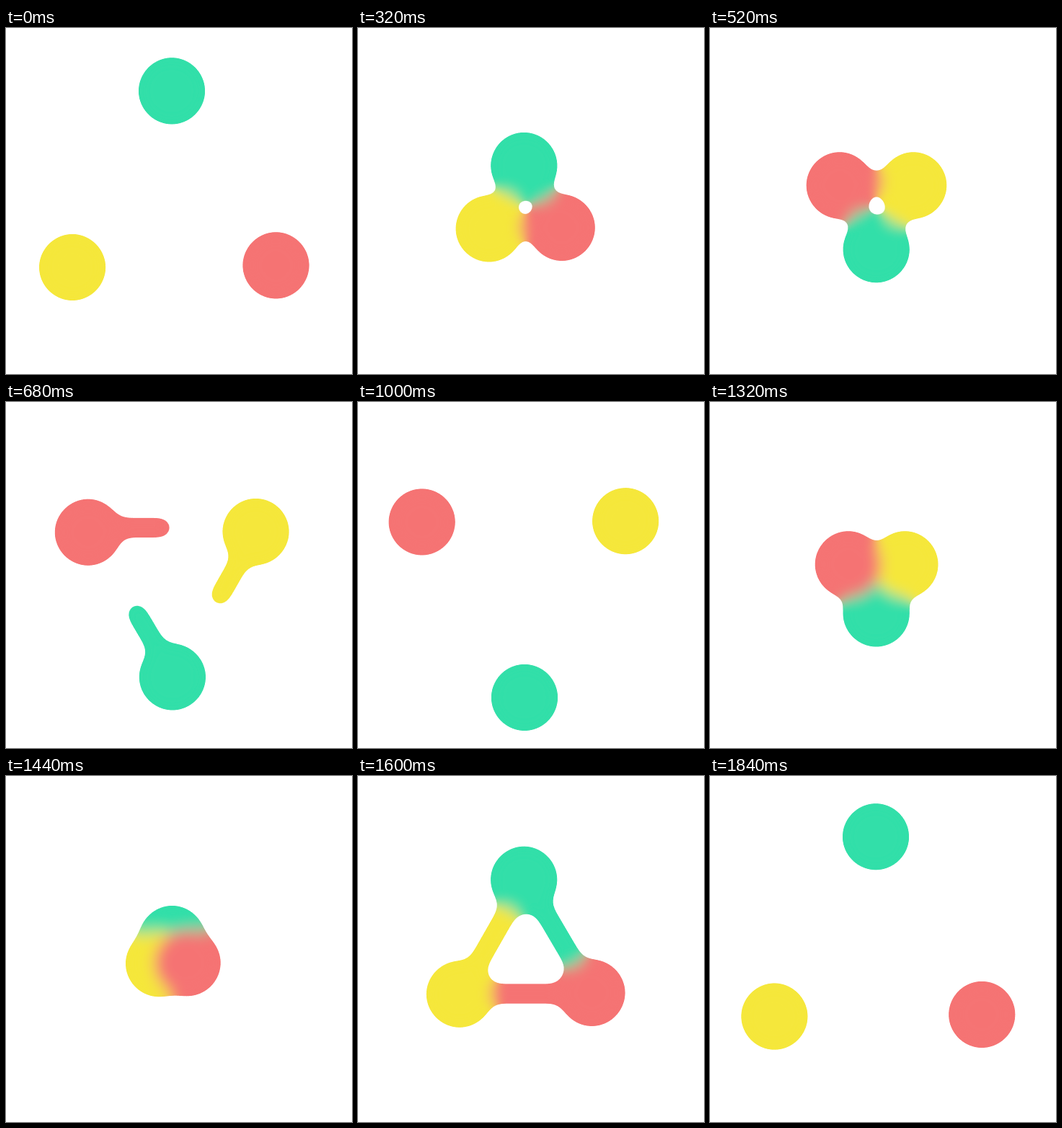
An HTML page without scripts for the animation above (1.96 s loop, 480x480 px).

```html
<!DOCTYPE html>
<html lang="en">
<head>
<meta charset="utf-8">
<title>Gooey trio</title>
<style>
  @property --tick {
    syntax: '<number>';
    inherits: true;
    initial-value: 0;
  }
  @keyframes run { to { --tick: 49; } }

  html, body { margin: 0; width: 100%; height: 100%; overflow: hidden; background: #fff; }

  svg {
    display: block;
    width: 100%;
    height: 100%;
    animation: run 1.96s steps(49) infinite;
    /* sine phases, in degrees, of the way out and the way back */
    --out: clamp(0, 8.28 * max(var(--tick), 1) + 3.3, 180);
    --back: clamp(0, 7.92 * var(--tick) - 187.3, 180);
    --p: (164.4 * cos((var(--out) + var(--back)) * 1deg));
    /* share of the side that each link covers: joins on contact, then retracts */
    --link:
      (clamp(0, min((var(--out) - 62) / 7, (159.7 - var(--out)) / 32), 1) +
       clamp(0, min((var(--back) - 62) / 7, (159.7 - var(--back)) / 32), 1));
  }

  .green  { fill: #30dfa9; --x: 230.5; --y: 248.4; --dx: -.003; --dy: -1;   --turn: 59.5deg; }
  .yellow { fill: #f5e73a; --x: 231.4; --y: 248.7; --dx: -.865; --dy: .517; --turn: -60.3deg; }
  .red    { fill: #f57373; --x: 231.8; --y: 248;   --dx: .886;  --dy: .505; --turn: 180deg; }

  /* the links run slightly off the ball centres */
  rect.green  { --x: 233; }
  rect.yellow { --x: 232.4; }
  rect.red    { --y: 245.9; --dy: .537; }

  circle, rect {
    --move: translate(
      calc((var(--x) + var(--dx) * var(--p)) * 1px),
      calc((var(--y) + var(--dy) * var(--p)) * 1px));
  }
  circle { r: 45px; transform: var(--move); }
  rect {
    y: -11.5px;
    width: 1px;
    height: 23px;
    transform: var(--move) rotate(var(--turn)) scaleX(calc(1.75 * var(--p) * var(--link)));
  }
</style>
</head>
<body>
<svg viewBox="0 0 480 480">
  <filter id="goo" filterUnits="userSpaceOnUse" x="0" y="0" width="480" height="480">
    <feGaussianBlur stdDeviation="10"/>
    <feColorMatrix values="1 0 0 0 0  0 1 0 0 0  0 0 1 0 0  0 0 0 30 -12"/>
  </filter>
  <g filter="url(#goo)">
    <rect class="green"/>
    <rect class="yellow"/>
    <rect class="red"/>
    <circle class="green"/>
    <circle class="yellow"/>
    <circle class="red"/>
  </g>
</svg>
</body>
</html>
```
